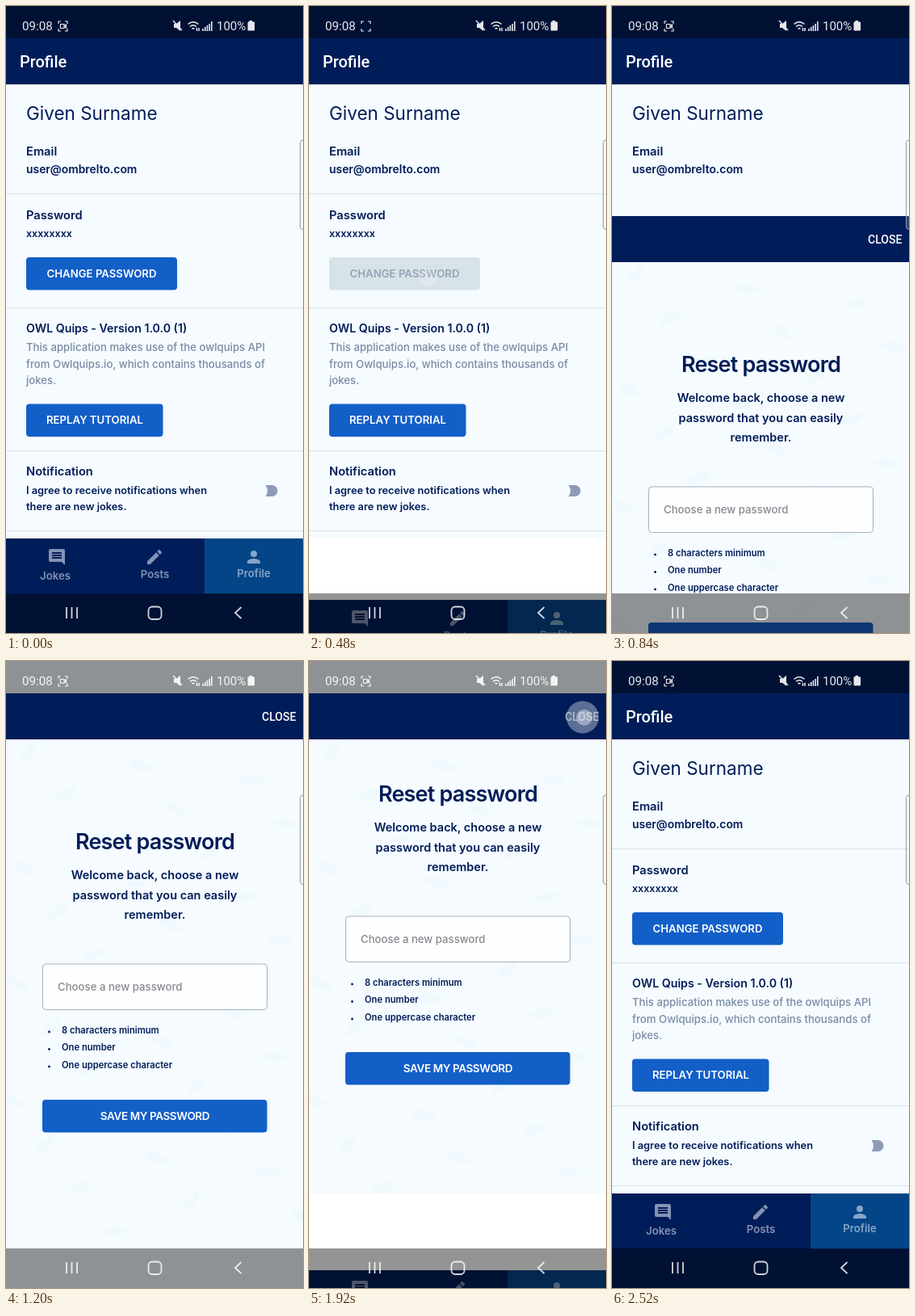
Write an HTML page that moves like this. It is 368 px wide and 776 px high and loops after 2640 ms.

```html
<!DOCTYPE html>
<html lang="en">
<head>
<meta charset="utf-8">
<title>Profile and password reset</title>
<style>
  html, body { margin: 0; width: 100%; height: 100%; overflow: hidden; background: #fff; }
  body > svg { display: block; width: 100vw; height: 100vh; }
  text { font-family: Inter, "Open Sans", sans-serif; font-weight: 600; fill: #001c58; white-space: pre; }
  .roboto { font-family: Roboto, sans-serif; font-weight: 500; fill: #fff; }
  .head { font-size: 14.7px; }
  .button { font-size: 13.2px; fill: #fff; text-anchor: middle; }
  .hint { font-size: 13.2px; font-weight: 500; fill: #7b8ba6; }
  .note { font-size: 12.8px; }
  .mid { font-size: 14.5px; text-anchor: middle; }
  .rule { font-size: 11.2px; }
  .tab text { font-size: 13.2px; text-anchor: middle; fill: inherit; }
  .navy { fill: #001d59; }
  .pale { fill: #f5fbff; }
  .blue { fill: #135fc8; }
  .line { fill: none; stroke: #fff; }
</style>
</head>
<body>
<svg viewBox="0 0 368 776">
  <rect width="368" height="776" fill="#fff"/>

  <g id="profile">
    <rect class="pale" width="368" height="659"/>
    <rect class="navy" width="368" height="97"/>
    <text class="roboto" x="17" y="76" font-size="20">Profile</text>
    <text x="25" y="141" style="font-size:22.5px;font-weight:400">Given Surname</text>
    <text class="head" x="25" y="185">Email</text>
    <text x="25" y="207" font-size="13.9">user@ombrelto.com</text>
    <text class="head" x="25" y="264">Password</text>
    <text x="25" y="286" font-size="12.5">xxxxxxxx</text>
    <rect id="change" x="25" y="311" width="187" height="40.5" rx="4"/>
    <text id="changeText" class="button" x="118.5" y="335.5">CHANGE PASSWORD</text>
    <circle id="tap" cx="148" cy="336" r="11" fill="#fff"/>
    <text class="head" x="25" y="404" style="font-size:14.2px">OWL Quips - Version 1.0.0 (1)</text>
    <text class="hint" x="25" y="427">This application makes use of the owlquips API</text>
    <text class="hint" x="25" y="447.5">from Owlquips.io, which contains thousands of</text>
    <text class="hint" x="25" y="468">jokes.</text>
    <rect class="blue" x="25" y="492.5" width="169.5" height="40.5" rx="4"/>
    <text class="button" x="110" y="517">REPLAY TUTORIAL</text>
    <text class="head" x="25" y="581">Notification</text>
    <text class="note" x="25" y="603.5">I agree to receive notifications when</text>
    <text class="note" x="25" y="624">there are new jokes.</text>
    <path fill="#8e9bb8" d="M321.5 593h8a7 7 0 0 1 0 14h-8q5-7 0-14z"/>
    <path stroke="#d9e2e8" d="M0 232.5h368M0 373.5h368M0 550.5h368M0 649.5h368"/>
  </g>

  <g id="modal">
    <svg id="sheet" width="368" height="776">
      <rect class="pale" width="100%" height="100%"/>
      <g id="leaves" fill="#f0f9fd"></g>
    </svg>
    <rect class="navy" y="40" width="368" height="57"/>
    <circle id="ripple" cx="339" cy="69.5" fill="#fff"/>
    <text id="close" class="roboto" x="317" y="74" font-size="14">CLOSE</text>
    <circle id="closeTap" cx="341" cy="70" r="10" fill="#e6ebf5" opacity=".45"/>
    <g id="form">
      <text x="184.5" y="232.5" text-anchor="middle" font-size="27" letter-spacing="-.8">Reset password</text>
      <text class="mid" x="184.5" y="270">Welcome back, choose a new</text>
      <text class="mid" x="184.5" y="294.5">password that you can easily</text>
      <text class="mid" x="184.5" y="319">remember.</text>
      <rect x="45.5" y="375" width="278" height="56.5" rx="4" fill="#fdfeff" stroke="#a3b0bd"/>
      <text class="hint" x="64" y="408" style="fill:#878a8e">Choose a new password</text>
      <text class="rule" x="69" y="460.5">8 characters minimum</text>
      <text class="rule" x="69" y="482">One number</text>
      <text class="rule" x="69" y="503.5">One uppercase character</text>
      <g class="navy">
        <circle cx="53.5" cy="459" r="1.4"/>
        <circle cx="53.5" cy="480.5" r="1.4"/>
        <circle cx="53.5" cy="502" r="1.4"/>
      </g>
      <rect class="blue" x="45" y="543" width="278.5" height="40.5" rx="4"/>
      <text class="button" x="184.5" y="567.5" style="font-size:13.5px;letter-spacing:-.4px">SAVE MY PASSWORD</text>
    </g>
  </g>

  <g id="tabs">
    <rect class="navy" y="659" width="368" height="160"/>
    <rect x="246" y="659" width="122" height="68.5" fill="#044587"/>
    <g class="tab" fill="#8592b4">
      <path transform="translate(51 670)" d="M22 4a2 2 0 0 0-2-2H4a2 2 0 0 0-2 2v12a2 2 0 0 0 2 2h14l4 4zM18 14H6v-2h12zm0-3H6V9h12zm0-3H6V6h12z"/>
      <text x="61" y="710">Jokes</text>
      <path transform="translate(172 670)" d="M3 17.25V21h3.75L17.8 9.95l-3.75-3.75zM20.7 7a1 1 0 0 0 0-1.4l-2.3-2.3a1 1 0 0 0-1.4 0l-1.85 1.85 3.75 3.75z"/>
      <text x="184.5" y="708">Posts</text>
    </g>
    <g class="tab" fill="#86a6c8">
      <path transform="translate(295 670)" d="M12 12a4 4 0 1 0 0-8a4 4 0 0 0 0 8zm0 2c-2.7 0-8 1.3-8 4v2h16v-2c0-2.7-5.3-4-8-4z"/>
      <text x="307" y="707">Profile</text>
    </g>
  </g>

  <!-- system bars -->
  <path fill-opacity=".42" d="M0 0h368v40H0zM0 727h368v49H0z"/>
  <g opacity=".9">
    <text class="roboto" x="20" y="30" style="font-size:15.2px;font-weight:400">09:08</text>
    <text class="roboto" x="261" y="30" style="font-size:15px;font-weight:400">100%</text>
    <path class="line" stroke-width="1.2" d="M65 22v-3h3M73 19h3v3M76 28v3h-3M68 31h-3v-3"/>
    <path id="camera" class="line" stroke-width="1.2" d="M67.5 22.5h4.5v5h-4.5zM72 25l2.5-2v4z"/>
    <path fill="#fff" d="M208 22h3l5-4v13l-5-4h-3z"/>
    <path class="line" stroke-width="1.5" d="M207 18l11 12"/>
    <path class="line" stroke-width="1.5" d="M225.5 22.5q6.5-5.5 13 0M228 25.5q4-3.5 8 0M230.5 28.3q1.5-1.3 3 0M236.5 27v4M239 27v4"/>
    <path class="line" stroke-width="1.6" d="M244 31v-3M246.7 31v-5M249.4 31v-7M252.1 31v-9M254.8 31v-12"/>
    <path fill="#fff" d="M301.5 18h3.5v1.5h2q1 0 1 1v9q0 1-1 1h-6.5q-1 0-1-1v-9q0-1 1-1h1z"/>
  </g>
  <g class="line" stroke-width="1.8" opacity=".82">
    <path d="M75 744v14M81.5 744v14M88 744v14M291.5 744l-7.5 7 7.5 7"/>
    <rect x="176.5" y="743.5" width="16" height="15.5" rx="4.5"/>
  </g>
  <rect x="364.5" y="166" width="12" height="110.5" rx="3.5" fill="#fff" fill-opacity=".2" stroke="#8f98a8"/>
</svg>

<script>
const LOOP = 2640, STEP = 120, HEIGHT = 776, TAB_TRAVEL = 117;
const el = id => document.getElementById(id);
const set = (id, attrs) => {
  for (const key in attrs) el(id).setAttribute(key, attrs[key]);
};
const shift = (id, y) => set(id, { transform: `translate(0 ${Math.round(y)})` });
const between = (t, a, b) => t >= a && t < b;

// Progress from 0 to 1 between two times, slowing down towards the end.
const easeOut = (t, from, to, power) =>
  1 - (1 - Math.min(1, Math.max(0, (t - from) / (to - from)))) ** power;

// Faint feathers scattered over the sheet.
const leaf = "M-16 2Q-8-8 5-6Q12-5 17-7Q13 3 3 5Q-7 7-16 2z";
el("leaves").innerHTML = Array.from({ length: 34 }, (_, i) => {
  const x = (i * 137 + 30) % 368, y = 112 + i * 18;
  return `<path d="${leaf}" transform="translate(${x} ${y}) rotate(${(i * 67) % 90 - 45})"/>`;
}).join("");

function draw(t) {
  const opening = t < 1500;
  const busy = between(t, 360, 1900);
  const squeezed = between(t, 1900, 2040);
  const pressed = t >= 1680;
  const released = t >= 2040;

  shift("tabs", TAB_TRAVEL * (opening
    ? easeOut(t, 360, 600, 1.5)
    : 1 - easeOut(t, 1884, 2160, 1.52)));
  shift("modal", HEIGHT * (opening
    ? 1 - easeOut(t, 600, 1200, 2.467)
    : easeOut(t, 1920, 2160, 1.35)));
  shift("form", squeezed ? -59 : released ? -34 : 0);
  set("sheet", { height: squeezed ? 659 : HEIGHT });

  set("change", { fill: busy ? "#d8e3e9" : "#135fc8" });
  el("changeText").style.fill = busy ? "#94a3b5" : "#fff";
  set("tap", { opacity: between(t, 120, 600) ? (t < 360 ? .35 : .18) : 0 });

  set("ripple", {
    r: pressed ? 8 + 12 * easeOut(t, 1560, 1860, 2) : 0,
    opacity: released ? .25 : .36
  });
  set("close", { opacity: released ? .4 : pressed ? .55 : 1 });
  set("closeTap", { visibility: pressed && !released ? "visible" : "hidden" });
  set("camera", {
    visibility: between(t, 360, 720) || between(t, 2040, 2400) ? "hidden" : "visible"
  });
}

// The picture advances in even steps, like a screen recording.
const start = performance.now();
function tick() {
  const t = (performance.now() - start) % LOOP;
  draw(Math.floor(t / STEP) * STEP);
  requestAnimationFrame(tick);
}
tick();
</script>
</body>
</html>
```
